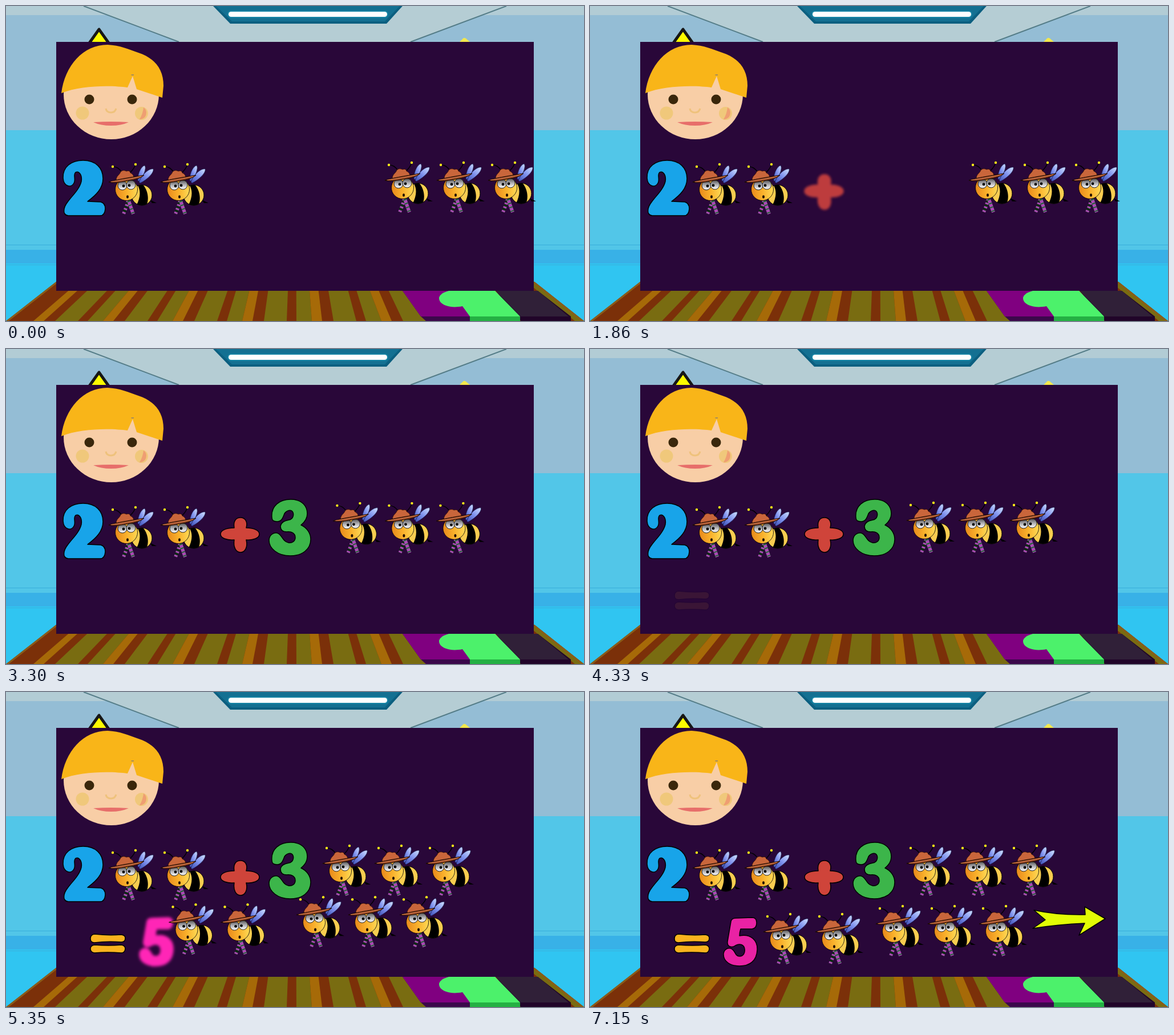
Recreate the animation shown at these times as an HTML page. Size 1013x553 px, loop 7950 ms.

```html
<!DOCTYPE html>
<html lang="en">
<head>
<meta charset="utf-8">
<title>Counting bees</title>
<style>
  html, body { margin: 0; width: 100%; height: 100%; overflow: hidden; background: #290739; }
  svg { display: block; width: 100%; height: 100%; }
  .ink { stroke: #000; stroke-width: 1.5; stroke-linejoin: round; }
</style>
</head>
<body>
<svg viewBox="0 0 1013 553" preserveAspectRatio="none">
  <defs>
    <linearGradient id="skin">
      <stop offset="0" stop-color="#e8891c"/><stop offset=".5" stop-color="#f9b02b"/><stop offset="1" stop-color="#ffd954"/>
    </linearGradient>
    <linearGradient id="wing" x1="0" y1="1" x2="1" y2="0">
      <stop offset="0" stop-color="#3d4fb4"/><stop offset=".5" stop-color="#7f92ee"/><stop offset="1" stop-color="#cfe0ff"/>
    </linearGradient>
    <linearGradient id="eye" x2="0" y2="1">
      <stop offset="0" stop-color="#56565a"/><stop offset=".5" stop-color="#b4b4b8"/><stop offset="1" stop-color="#fff"/>
    </linearGradient>
    <clipPath id="bodyClip"><ellipse cx="59" cy="57" rx="18" ry="18"/></clipPath>
    <clipPath id="floorClip"><path d="M88 484H926L1013 553H0Z"/></clipPath>

    <g id="bee">
      <g fill="url(#wing)" stroke="#17184a" stroke-width=".8">
        <path d="M52 32C51 20 58 6 64 5C68 9 62 24 55 33Z"/>
        <path d="M54 34C59 21 71 10 79 11C81 18 68 30 56 36Z"/>
      </g>
      <path d="M73 65L85 71L77 71Z"/>
      <g clip-path="url(#bodyClip)">
        <rect x="40" y="37" width="40" height="40" fill="#f8cd50"/>
        <path d="M47 34C58 44 58 60 49 76L66 78C73 64 70 48 59 36Z"/>
      </g>
      <ellipse cx="59" cy="57" rx="18" ry="18" fill="none" stroke="#000"/>
      <g fill="none" stroke-width="6">
        <path d="M35 67Q32 78 27 90" stroke="#0d2a14"/>
        <path d="M36 67Q40 79 44 90" stroke="#a94cb4"/>
        <path d="M35 67Q32 78 27 90" stroke="#a94cb4" stroke-dasharray="3 4"/>
        <path d="M36 67Q40 79 44 90" stroke="#1c6a30" stroke-dasharray="2 5"/>
      </g>
      <circle cx="32" cy="47" r="19.5" fill="url(#skin)" stroke="#000" stroke-width=".8"/>
      <g fill="url(#eye)" stroke="#222" stroke-width="1">
        <circle cx="25" cy="40" r="8"/><circle cx="40" cy="39" r="8"/>
      </g>
      <circle cx="27" cy="41" r="2.4"/><circle cx="37" cy="40" r="2.4"/>
      <ellipse cx="34" cy="60" rx="2" ry="2.8" fill="#241000"/>
      <path d="M8 7Q18 7 24 17M48 3Q46 10 39 17" fill="none" stroke="#000" stroke-width="1.3"/>
      <g fill="#ffee18"><circle cx="8" cy="7" r="2.2"/><circle cx="48" cy="3" r="2.2"/></g>
      <path d="M14 31C14 23 20 22 22 16Q26 12 32 15Q38 13 39 18C43 20 45 22 45 28Z" fill="#c9663b" stroke="#351200" stroke-width=".8"/>
      <path d="M1 34C12 30 44 25 63 22Q56 29 34 32Q12 37 1 34Z" fill="#8f4320" stroke="#150600" stroke-width="1"/>
      <path d="M5 33.5Q34 30 58 24" fill="none" stroke="#e68a5c" stroke-width="1"/>
    </g>
  </defs>

  <g id="room">
    <rect width="1013" height="553" fill="#30c5f1"/>
    <rect width="1013" height="428" fill="#52c6e8"/>
    <rect width="1013" height="218" fill="#94bdd5"/>
    <rect width="1013" height="16" fill="#b2ccd5"/>
    <rect y="428" width="1013" height="24" fill="#38b1e7"/>
    <path d="M0 419.5H1013M0 454.5H1013" stroke="#39aedc"/>
    <path d="M136 0L303 63H709L877 0Z" fill="#b5cdd4"/>
    <path d="M136 0L303 63M709 63L877 0" stroke="#557d88" stroke-width="2"/>
    <path d="M363 0H695L667 31H393Z" fill="#0b5f80"/>
    <path d="M368 0H690L664 27H396Z" fill="#137092"/>
    <rect x="388" y="8" width="282" height="13" rx="6.5" fill="#1684a5"/>
    <rect x="390" y="10" width="278" height="9" rx="4.5" fill="#fff"/>
    <path d="M163 41L141 72H185Z" fill="#fdfb00" stroke="#171717" stroke-width="5" stroke-linejoin="round"/>
    <path d="M795 63L801 57Q803 55 806 57L813 63Z" fill="#f3e84d"/>
    <g clip-path="url(#floorClip)">
      <rect y="480" width="1013" height="80" fill="#7b3009"/>
      <g id="planks"></g>
      <path d="M88 484L0 553M926 484L1013 553" stroke="#8b5c18" stroke-width="6"/>
    </g>
    <path d="M695 500H790L815 545V553H736L727 545Z" fill="#3b084b"/>
    <path d="M695 500H790L813 545H727Z" fill="#800080"/>
    <path d="M858 500H932L990 545V553H902Z" fill="#210529"/>
    <path d="M858 500H932L986 545H902Z" fill="#302038"/>
    <path d="M813 545H901V553H813Z" fill="#24b043"/>
    <path d="M776 500H857L901 545H813L800 527C775 532 758 523 759 512Q761 504 776 500Z" fill="#4cf16b"/>
    <rect x="88" y="63" width="837" height="437" fill="#290739"/>
  </g>

  <g id="face">
    <ellipse cx="184.5" cy="155" rx="83.5" ry="79" fill="#f8cea6"/>
    <path d="M97 153C103 105 135 68 178 68C200 69 215 76 232 82C262 92 276 112 276 140L274 161L229 146L222 123L213 143C185 139 130 139 97 153Z" fill="#f9b518"/>
    <path d="M219.5 121H224" stroke="#8d8170" stroke-width="1.5"/>
    <g fill="#3a270b"><circle cx="146" cy="164" r="8.5"/><circle cx="221" cy="164" r="8.5"/></g>
    <g fill="#f0c87b"><circle cx="134" cy="188" r="11.5"/><circle cx="237.5" cy="188.5" r="11.5"/></g>
    <path d="M241 178A11.5 11.5 0 0 1 234 199Q240 189 241 178Z" fill="#ef9e72"/>
    <path d="M175 180Q176 187 184 187Q191 187 193 180" fill="none" stroke="#efc27c" stroke-width="3"/>
    <path d="M153 204Q184 202 215 204Q202 210 184 210Q166 210 153 204Z" fill="#e76e6a"/>
  </g>

  <path id="two" class="ink" fill="#18a4e9" d="M100 302C99 282 115 271 135 271C157 271 170 284 170 303C170 320 158 332 143 343L166 344Q174 346 174 356Q173 368 165 368L109 368Q100 367 102 356C104 342 127 328 132 308C134 297 128 289 122 292C117 296 123 304 119 311C114 320 101 317 100 302Z"/>
  <path id="plus" class="ink" fill="#cf443a" d="M400 314C398 302 403 296 411 296C419 296 424 303 421 314C433 314 444 318 444 325C444 332 433 336 421 335C424 348 419 357 411 357C403 357 398 348 400 335C387 336 376 332 376 325C376 318 387 314 400 314Z"/>
  <path id="three" class="ink" fill="#3cb54a" d="M466 296C464 275 480 264 499 264C520 264 528 277 528 289C528 299 522 305 517 309C528 314 534 324 534 334C534 352 519 363 498 363C476 363 461 350 461 336C461 327 468 322 475 323C484 325 484 338 495 340C502 341 507 337 507 331C507 323 500 320 492 321C483 321 481 316 481 311C482 303 490 301 496 300C502 299 505 293 503 287C500 281 492 283 488 289C485 297 483 303 475 303C469 303 466 300 466 296Z"/>
  <path id="equals" class="ink" fill="#fab31e" d="M155 425Q180 428 202 426Q209 427 209 432Q209 439 202 439Q178 437 155 440Q148 440 148 433Q148 426 155 425ZM155 444Q180 446 202 444Q209 445 209 451Q208 458 202 458Q178 456 155 458Q148 457 148 451Q148 445 155 444Z"/>
  <path id="five" class="ink" fill="#e922a4" d="M247 403Q248 397 256 397L284 396Q292 396 292 405Q292 415 284 416L264 416Q262 422 262 428C282 424 294 436 293 453C292 472 280 481 262 481C246 481 234 473 234 461C234 453 240 449 246 450C255 452 253 464 262 464C269 464 272 458 271 451C270 443 262 441 255 445C248 450 240 447 241 438Z"/>
  <g id="bees"></g>
  <path id="arrow" class="ink" fill="#e2fc05" d="M778 383Q820 392 868 391L867 377L903 398L857 427L867 406Q820 408 776 415L798 400Z"/>
</svg>
<script>
const LOOP = 7950;
const $ = id => document.getElementById(id);
const clamp = v => Math.min(1, Math.max(0, v));
const span = (t, start, length) => clamp((t - start) / length);
const smooth = u => u < .5 ? 2 * u * u : 1 - 2 * (1 - u) ** 2;
const bump = u => Math.sin(Math.PI * u);

function add(parent, tag, attrs) {
  const el = document.createElementNS('http://www.w3.org/2000/svg', tag);
  for (const key in attrs) el.setAttribute(key, attrs[key]);
  return parent.appendChild(el);
}

// Floor planks run towards one vanishing point: x positions are those at the bottom edge.
const atTop = x => 507 + (x - 507) * 328 / 397;
function plank(left, width, fill) {
  const right = left + width;
  add($('planks'), 'path', { fill, d: `M${atTop(left)} 484H${atTop(right)}L${right} 553H${left}Z` });
}
for (let x = 48; x < 1013; x += 122) {
  plank(x, 18, '#a66a08');
  plank(x + 38, 40, '#796c11');
  plank(x + 95, 27, '#796c11');
}

const makeBees = spots => spots.map(([x, y]) => ({ x, y, el: add($('bees'), 'use', { href: '#bee' }) }));
const leftSpots = [[179, 275], [270, 275]];
const rightSpots = [[663, 272], [754, 272], [844, 272]];
const leftCopies = makeBees(leftSpots);
const rightCopies = makeBees(rightSpots);
const leftBees = makeBees(leftSpots);
const rightBees = makeBees(rightSpots);

function placeBees(bees, dx, dy, scale = 1) {
  for (const { x, y, el } of bees) {
    el.setAttribute('transform', `translate(${x + dx + 42.5 * (1 - scale)} ${y + dy + 46 * (1 - scale)}) scale(${scale})`);
  }
}
function scaleAbout(el, cx, cy, sx, sy) {
  el.setAttribute('transform', `translate(${cx} ${cy}) scale(${sx} ${sy}) translate(${-cx} ${-cy})`);
}
function glow(el, amount) {
  const on = amount > .01;
  el.style.filter = on ? `blur(${3.5 * amount}px) brightness(${1 + .15 * amount})` : 'none';
  el.style.stroke = on ? el.getAttribute('fill') : '#000';
}
function show(list, visible) {
  list.forEach(({ el }) => el.style.visibility = visible ? 'visible' : 'hidden');
}

function draw(t) {
  const pulse = bump(span(t, 30, 780));
  scaleAbout($('two'), 136, 319.5, 1 + .32 * pulse, 1 + .32 * pulse);
  placeBees(leftBees, 0, 0, 1 + .2 * pulse);

  const plus = span(t, 1620, 300);
  $('plus').style.opacity = plus;
  glow($('plus'), bump(plus));

  $('three').style.opacity = t < 2820 ? 0 : span(t, 2770, 400);
  const slide = smooth(span(t, 2820, 678));
  placeBees(rightBees, -109 * slide, -5 * slide);

  $('equals').style.opacity = span(t, 4300, 400);
  $('five').style.opacity = span(t, 4780, 480);
  glow($('five'), bump(span(t, 5140, 780)));

  const drop = smooth(span(t, 4440, 1253));
  show([...leftCopies, ...rightCopies], drop > 0);
  placeBees(leftCopies, 124 * drop, 112 * drop);
  placeBees(rightCopies, -109 - 54 * drop, -5 + 106 * drop);

  const land = span(t, 6250, 900);
  $('arrow').style.opacity = land;
  scaleAbout($('arrow'), 840, 402, 1 + .62 * (1 - land), 1 + .3 * (1 - land));
}

const began = performance.now();
function tick() {
  draw((performance.now() - began) % LOOP);
  requestAnimationFrame(tick);
}
tick();
</script>
</body>
</html>
```
